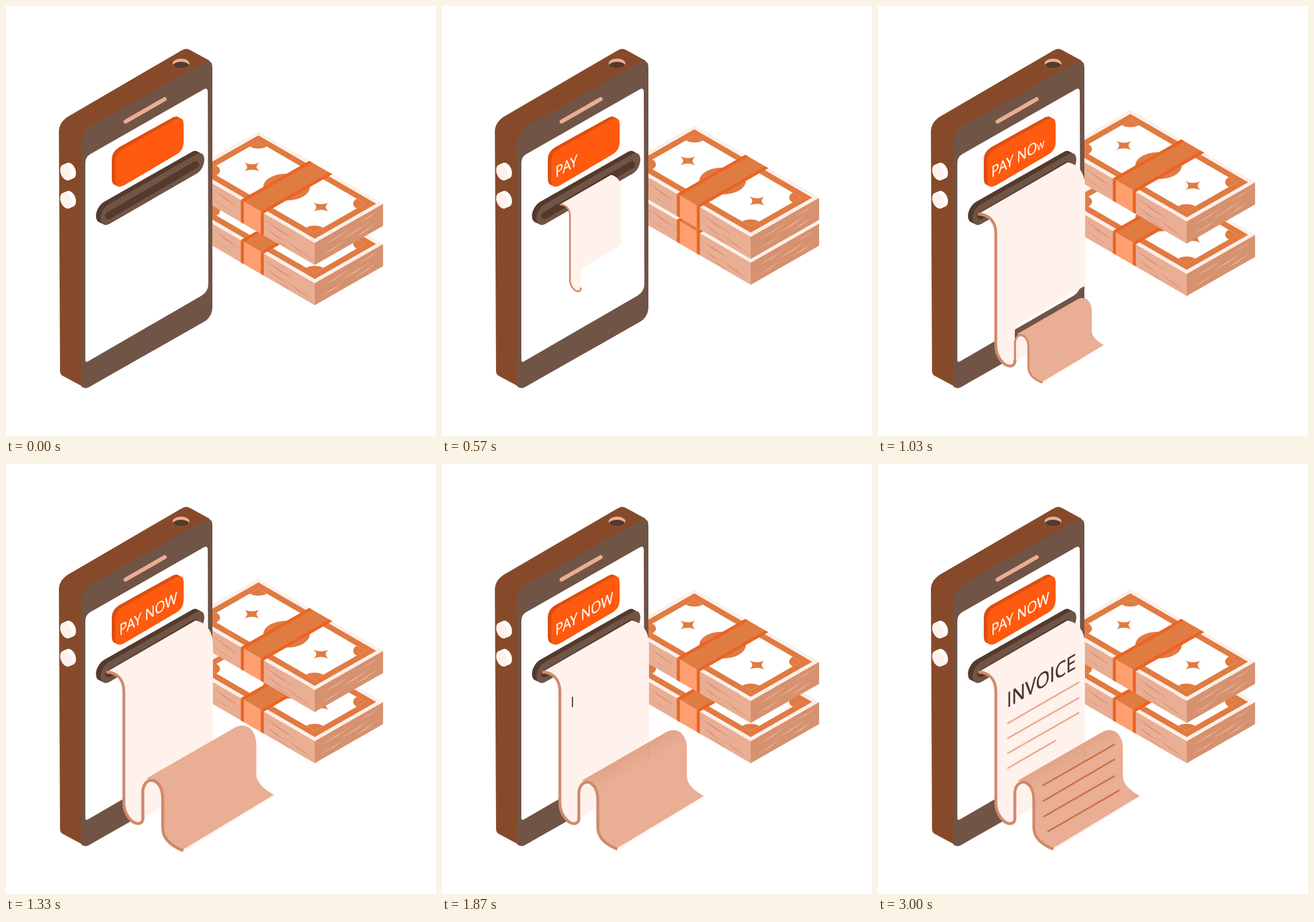
These frames come from a looping animation (748 px wide and 748 px high, 4 s). An HTML page:

```html
<!DOCTYPE html>
<html lang="en">
<head>
<meta charset="utf-8">
<title>Mobile payment</title>
<style>
  html, body { margin: 0; width: 100%; height: 100%; overflow: hidden; background: #fff; }
  svg { display: block; width: 100vw; height: 100vh; }
  text { font-family: "Open Sans", "Noto Sans", sans-serif; }
  .line { fill: none; stroke-linecap: round; stroke-width: 3; }
</style>
</head>
<body>
<svg viewBox="0 0 748 748">
  <defs>
    <linearGradient id="bend" gradientUnits="userSpaceOnUse" x1="318" y1="507" x2="334" y2="535">
      <stop offset="0" stop-color="#d99c7e" stop-opacity=".5"/>
      <stop offset="1" stop-color="#d99c7e" stop-opacity="0"/>
    </linearGradient>
    <clipPath id="noteArea"><rect x="18" y="18" width="214" height="101"/></clipPath>
    <clipPath id="jack"><ellipse cx="304.500" cy="100" rx="14.500" ry="8.500"/></clipPath>
    <path id="star" d="M15 0Q2 2 0 15Q-2 2 -15 0Q-2 -2 0 -15Q2 -2 15 0Z"/>
    <path id="payShape" d="M190 271Q190 256 204 248L296 197Q309 191 309 206V236Q309 251 297 258L207 311Q190 321 190 302Z"/>
    <path id="slotShape" d="M164.500 369C164.500 361 170 350 178 345L331 258C340 253 345 258 345 267C345 277 339 288 331 292L180 379C171 384 164.500 379 164.500 369Z"/>

    <g id="bundle">
      <!-- long side -->
      <g transform="matrix(.868 .504 0 1 320 286)">
        <rect width="250" height="38.500" fill="#e9ae94"/>
        <path fill="#d6916f" d="M45 9l57 7l-30 -1zM42 26l52 4l-27 -1zM150 10l62 5l-34 0zM152 23l44 6l-24 -1zM190 24l56 8l-30 -2zM165 33l42 3l-20 0z"/>
        <rect x="102" width="46" height="38.500" fill="#ff9f70"/>
        <path fill="#ea6423" d="M102 0h6v38.500h-6zM142 0h6v38.500h-6z"/>
      </g>
      <!-- short side -->
      <g transform="matrix(.868 -.496 0 1 537 412)">
        <rect width="137" height="38.500" fill="#d6916f"/>
        <path fill="#e9ae94" d="M14 13l58 -3l-28 4zM50 21l62 -4l-30 5zM12 29l50 -3l-25 4zM80 30l44 -4l-22 5zM86 9l44 -2l-20 3z"/>
      </g>
      <!-- top note -->
      <g transform="matrix(.868 .504 -.868 .496 439 218)">
        <rect width="250" height="137" fill="#fdefe9"/>
        <rect x="7" y="7" width="236" height="123" fill="#e07b42"/>
        <rect x="18" y="18" width="214" height="101" fill="#fff"/>
        <g fill="#e07b42">
          <g clip-path="url(#noteArea)">
            <circle cx="18" cy="18" r="17"/><circle cx="232" cy="18" r="17"/>
            <circle cx="18" cy="119" r="17"/><circle cx="232" cy="119" r="17"/>
          </g>
          <circle cx="125" cy="68.500" r="33"/>
          <use href="#star" x="55.500" y="68.500"/><use href="#star" x="194" y="68.500"/>
          <rect x="102" width="46" height="137"/>
        </g>
        <path fill="#ea6423" d="M102 0h6v137h-6zM142 0h6v137h-6z"/>
      </g>
    </g>

    <ellipse id="buttonDisc" rx="9.500" ry="14.500" transform="rotate(-22)"/>
    <g id="sideButton" fill="#fff">
      <use href="#buttonDisc" x="111.500" y="286.500"/>
      <use href="#buttonDisc" x="108" y="288"/>
      <use href="#buttonDisc" x="104.500" y="289.500" fill="#fff1ec"/>
    </g>
  </defs>

  <use href="#bundle" id="lowerBundle"/>
  <use href="#bundle" id="upperBundle"/>

  <!-- phone -->
  <path fill="#864a2b" d="M92 217Q93 200 112 190L306 77Q314 72 321 77L354 95L340 300L139 665L98 643Q94 640 94 635Z"/>
  <path fill="#705446" d="M131 240Q131 218 149 208L344 99Q359 91 359 107V525Q358 541 345 549L146 662Q139 667 131 662Z"/>
  <path fill="#fff" d="M138 273Q138 263 146 258L344 145Q351 141 351 150L352 483Q352 497 340 504L143 618Q138 621 138 615Z"/>
  <path d="M208 201L276 162" stroke="#e9ae94" stroke-width="7" stroke-linecap="round"/>
  <g clip-path="url(#jack)">
    <rect x="288" y="90" width="34" height="20" fill="#e9ae94"/>
    <ellipse cx="304.500" cy="105" rx="14.500" ry="8" fill="#54392d"/>
  </g>
  <use href="#sideButton"/><use href="#sideButton" y="49"/>

  <g fill="#db4e10">
    <use href="#payShape" x="-6" y="-3"/><use href="#payShape" x="-3" y="-1.500"/>
  </g>
  <use href="#payShape" fill="#ff5a0f"/>
  <g id="payText" fill="#fff" stroke="#fff" stroke-width=".3" transform="matrix(.866 -.5 0 1 197 299)"></g>

  <g fill="#54392d">
    <use href="#slotShape" x="-8" y="-4"/><use href="#slotShape" x="-4" y="-2"/>
  </g>
  <use href="#slotShape" fill="#705446"/>
  <path d="M178 365L330 276" stroke="#54392d" stroke-width="12" stroke-linecap="round"/>

  <!-- receipt -->
  <g id="sheet">
    <path fill="#fff1ec" d="M176 361L330 272C350 277 360 292 360 315V486L245 553Q238 558 238 566V613Q236 625 230 624C218 622 206 606 206 590V395C206 375 193 363 176 361Z"/>
    <path fill="none" stroke="#d08a6a" stroke-width="5" d="M174 362C192 362 205 374 205 395V590C205 608 218 625 229 625.500C236 626 238.500 621 238.500 614"/>
  </g>
  <g id="curl">
    <path fill="#fff1ec" d="M239 566L250 551L273 570V596L239 616Z"/>
    <path id="curlFace" fill="#e9ae94" d="M243 551L391 466C411 456 426 472 426 495V545Q427 562 456 578L305 668C283 658 273 648 273 630V588C273 566 262 552 243 551Z"/>
    <g id="shade">
      <use href="#curlFace" style="fill:url(#bend)"/>
      <path fill="url(#bend)" d="M243 551L391 466C411 456 426 472 426 495L273 588C273 566 262 552 243 551Z"/>
      <path d="M360 487V510" stroke="#d08a6a" stroke-opacity=".5"/>
    </g>
    <path fill="#fff1ec" d="M305 668L456 577V579.500L305 672Z"/>
    <path fill="none" stroke="#d08a6a" stroke-width="5" d="M238 617V574C238 545 271 545 271 585V632C271 650 285 662 305 670"/>
  </g>
  <g id="invoiceText" fill="#4a342c" stroke="#4a342c" stroke-width=".5" transform="matrix(.866 -.5 0 1 224 424.500)"></g>
  <g id="rules"></g>
</svg>

<script>
const LOOP = 4000;
const SVG_NS = "http://www.w3.org/2000/svg";
const byId = id => document.getElementById(id);

function add(parent, tag, attributes) {
  const node = document.createElementNS(SVG_NS, tag);
  for (const name in attributes) node.setAttribute(name, attributes[name]);
  return parent.appendChild(node);
}

const progress = (t, start, length) => Math.min(1, Math.max(0, (t - start) / length));
const ease = p => (1 - Math.cos(Math.PI * p)) / 2;
const pulse = (t, start, half) => ease(progress(t, start, half)) - ease(progress(t, start + half, half));
const pop = (t, start) =>
  1.1 * ease(progress(t, start, 333)) - 0.1 * ease(progress(t, start + 333, 333));

function scaleAbout(node, x, y, s) {
  node.setAttribute("transform", `translate(${x} ${y}) scale(${s}) translate(${-x} ${-y})`);
  node.style.display = s > 0.001 ? "" : "none";
}

// Splits a word into letters, each growing from its own baseline start.
function makeLetters(parent, word, size) {
  const ruler = document.createElement("canvas").getContext("2d");
  ruler.font = `${size}px "Open Sans", "Noto Sans", sans-serif`;
  const width = s => ruler.measureText(s).width;
  const letters = [];
  [...word].forEach((char, i) => {
    if (char === " ") return;
    const node = add(parent, "text", { "font-size": size });
    node.textContent = char;
    letters.push({ node, x: width(word.slice(0, i + 1)) - width(char) });
  });
  return letters;
}

function showLetters(letters, t, start) {
  const step = 1067 / letters.length;
  letters.forEach(({ node, x }, i) => {
    const s = progress(t, start + i * step, step);
    node.setAttribute("transform", `translate(${x} 0) scale(${s})`);
    node.style.display = s > 0 ? "" : "none";
  });
}

const payLetters = makeLetters(byId("payText"), "PAY NOW", 26.5);
const invoiceLetters = makeLetters(byId("invoiceText"), "INVOICE", 36);

const rules = [
  [226, 451, 349, 380], [226, 477, 349, 407], [226, 503, 349, 433], [226, 529, 309, 481],
  [287, 559, 411, 488], [288, 586, 411, 514], [289, 613, 411, 543], [296, 639, 419, 568]
].map(([x1, y1, x2, y2], i) => ({
  x1, y1, x2, y2,
  node: add(byId("rules"), "line", { class: "line", x1, y1, stroke: i < 4 ? "#e9ae94" : "#cc7248" })
}));

function draw(t) {
  byId("lowerBundle").setAttribute("y", 70 - 37.5 * pulse(t, 0, 667));
  byId("upperBundle").setAttribute("y", -37.5 * pulse(t, 333, 667));

  scaleAbout(byId("sheet"), 246, 323, pop(t, 400));
  scaleAbout(byId("curl"), 239, 619, pop(t, 833));
  byId("shade").style.opacity = progress(t, 1400, 200);

  showLetters(payLetters, t, 33);
  showLetters(invoiceLetters, t, 1767);

  rules.forEach(({ node, x1, y1, x2, y2 }, i) => {
    const p = ease(progress(t, 2350 + i * 45, 330));
    node.setAttribute("x2", x1 + (x2 - x1) * p);
    node.setAttribute("y2", y1 + (y2 - y1) * p);
    node.style.display = p > 0 ? "" : "none";
  });
}

function frame() {
  draw(performance.now() % LOOP);
  requestAnimationFrame(frame);
}
frame();
</script>
</body>
</html>
```
